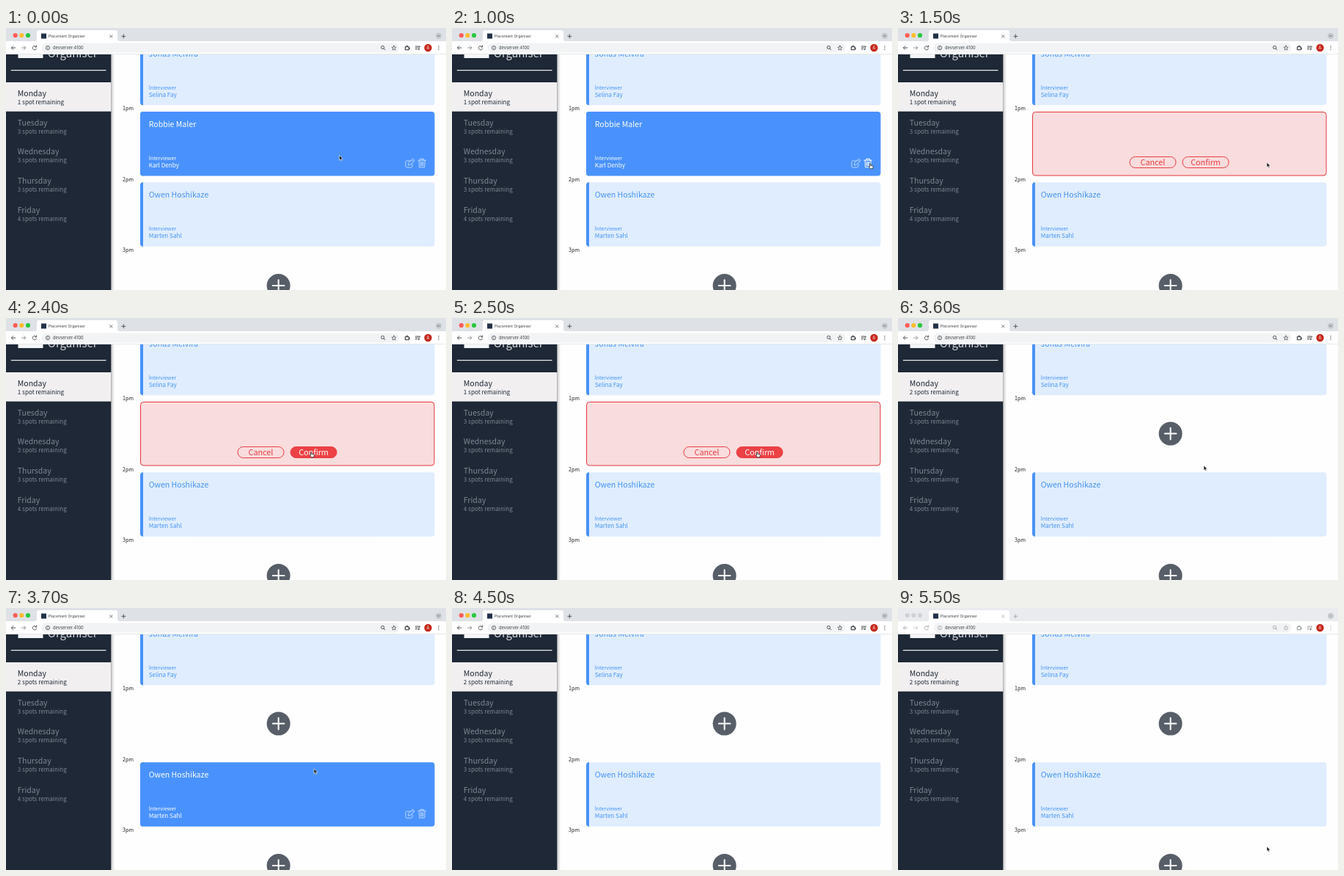
An HTML page that plays this animation: 600x357 px, repeating every 5.6 s.

```html
<!DOCTYPE html>
<html lang="en">
<head>
<meta charset="utf-8">
<title>Placement Organiser</title>
<style>
  html, body { margin: 0; width: 100%; height: 100%; overflow: hidden; background: #fefefe; }
  svg { display: block; width: 100%; height: 100%; }
  text { font-family: "Noto Sans CJK JP", "Noto Sans CJK SC", "Noto Sans CJK", "Noto Sans", sans-serif; }
  .ui { font-family: Inter, Roboto, sans-serif; fill: #3c4043; }
  .line { fill: none; stroke-width: 1; stroke-linecap: round; stroke-linejoin: round; }
  .tool { stroke: #53575b; fill: none; }
  .light { font-weight: 300; }
  .medium { font-weight: 500; }
  .card .bg { fill: #e0edfe; }
  .card .edge { fill: #4a92f7; }
  .card text { fill: #4493f4; }
  .card .icons { display: none; stroke: #fff; }
  .card.hover .bg, .card.hover .edge { fill: #4992fd; }
  .card.hover text { fill: #fff; }
  .card.hover .icons { display: inline; }
  .icons g { opacity: .62; }
  .icons g.active { opacity: 1; }
  .button rect { fill: none; stroke: #e83e43; }
  .button text { fill: #e83e43; font-size: 10.8px; text-anchor: middle; }
  .button.hover rect { fill: #ec4145; }
  .button.hover text { fill: #fff; }
  .blurred .tool { stroke: #a9acaf; }
  .blurred .dot { fill: #cfd1d3; }
  .blurred #strip { fill: #e9ebee; }
</style>
</head>
<body>
<svg id="stage" viewBox="0 0 600 357" xmlns="http://www.w3.org/2000/svg"></svg>
<script>
const LOOP = 5600, STEP = 100;
const CONFIRM_AT = 1200, DELETING_AT = 2600, EMPTY_AT = 3400, BLUR_AT = 4700;

// Pointer tip: [time, x, y]
const pointerPath = [
  [0, 454.5, 173.5], [200, 471, 176], [600, 569.5, 184], [1250, 569.5, 184],
  [1800, 415.5, 182], [3300, 415.5, 182], [3600, 417, 201], [3700, 420, 219],
  [3800, 424, 257], [3900, 430, 327], [4000, 434, 375], [5200, 525, 375],
  [5500, 503, 325], [5600, 503, 325]
];

const text = (x, y, size, str, cls = '', extra = '') =>
  `<text x="${x}" y="${y}" font-size="${size}" class="${cls}" ${extra}>${str}</text>`;

const rect = (x, y, w, h, fill, extra = '') =>
  `<rect x="${x}" y="${y}" width="${w}" height="${h}" fill="${fill}" ${extra}/>`;

const circle = (x, y, r, fill, extra = '') =>
  `<circle cx="${x}" cy="${y}" r="${r}" fill="${fill}" ${extra}/>`;

const path = (d, cls = 'line tool', extra = '') => `<path d="${d}" class="${cls}" ${extra}/>`;

const actionIcons = y => `
  <g class="icons line" transform="translate(0 ${y})">
    <g>${path('M552 67H546.5Q545 67 545 68.5V74.5Q545 76 546.5 76H552.5Q554 76 554 74.5V71', 'line')}
       ${path('M548.5 72.5L549 69.7L554.6 64.2L557.2 66.6L551.4 72.2ZM553.2 65.6L555.7 68', 'line')}</g>
    <g class="trash">${path('M562 66.2H572.4M565 66V64.3H569.4V66M563.2 66.5L563.7 75.8H570.7L571.2 66.5M565.6 68.5V73.7M567.2 68.5V73.7M568.8 68.5V73.7', 'line')}</g>
  </g>`;

const card = (id, y, student, interviewer) => `
  <g id="${id}" class="card">
    ${rect(183, y, 401.5, 87.5, '', 'rx="4" class="bg"')}
    <path class="edge" d="M187 ${y}V${y + 87.5}Q183 ${y + 87.5} 183 ${y + 83.5}V${y + 4}Q183 ${y} 187 ${y}Z"/>
    ${text(194.7, y + 21, 10.55, student)}
    ${text(194.7, y + 65.8, 7, 'Interviewer', 'light')}
    ${text(194.7, y + 75.8, 8.1, interviewer, 'medium')}
    ${actionIcons(y)}
  </g>`;

const addButton = (y, id = '') => `
  <g id="${id}">${circle(371.6, y, 16, '#575e68')}
    ${path(`M363.8 ${y}H379.4M371.6 ${y - 7.8}V${y + 7.8}`, 'line', 'stroke="#fff" style="stroke-width:2"')}
  </g>`;

const button = (id, x, label) => `
  <g id="${id}" class="button">${rect(x, 175.5, 63, 15, '', 'rx="7.5"')}
    ${text(x + 31.5, 187, 10.8, label)}</g>`;

const day = (name, spots, i) => {
  const y = 93 + i * 39.7, first = i === 0;
  const fill = `fill="${first ? '#1f2836' : '#7f8892'}"`;
  return text(15.8, y, 10.5, name, '', fill) +
    text(15.8, y + 11, 8.1, spots, 'light', fill + (first ? ' id="spots"' : ''));
};

const browser = `
  <g id="browser">
    ${rect(0, 0, 600, 18, '#dee1e6', 'id="strip"')}
    <path d="M39 18Q42 18 42 15V6Q42 3 45 3H149Q152 3 152 6V15Q152 18 155 18Z" fill="#fff"/>
    ${rect(0, 18, 600, 18, '#fff')}
    ${rect(0, 35.3, 600, .7, '#dcdee0')}
    ${[['#fc5b57', 12.7], ['#fdbc2e', 21.3], ['#28c840', 30]].map(([c, x]) => circle(x, 10, 3.1, c, 'class="dot"')).join('')}
    ${rect(48, 7.5, 7, 7, '#223248')}
    ${text(57.7, 13.2, 5.1, 'Placement Organiser', 'ui')}
    ${path('M141.6 9.6L145 13M145 9.6L141.6 13', 'line tool', 'style="stroke-width:.8"')}
    ${path('M157.8 11.3H162.8M160.3 8.8V13.8')}
    ${circle(590, 10.7, 4, '#c5c9cd')}
    ${path('M588.4 10L590 11.6L591.6 10', 'line tool', 'style="stroke-width:.8"')}
    ${path('M12.8 27H7.4M9.8 24.6L7.4 27L9.8 29.4')}
    ${path('M21.4 27H26.8M24.4 24.6L26.8 27L24.4 29.4', 'line tool', 'opacity=".6"')}
    ${path('M41.3 25.7A2.7 2.7 0 1 0 41.5 28.2M41.6 24V26H39.6')}
    ${rect(48.5, 20.4, 488, 13, '#f1f3f4', 'rx="6.5"')}
    <circle cx="57" cy="27" r="2.7" class="tool" stroke-width=".8"/>
    ${path('M57 26.8V28.4M57 25.5V25.6', 'line tool', 'style="stroke-width:.8"')}
    ${text(64, 29, 5.7, 'devserver:4100', 'ui')}
    <circle cx="513.6" cy="26.4" r="2.1" class="tool"/>${path('M515.2 28L517 29.8')}
    ${path('M529 24L529.9 26.1L532.1 26.3L530.4 27.8L530.9 30L529 28.8L527.1 30L527.6 27.8L525.9 26.3L528.1 26.1Z', 'line tool', 'style="stroke-width:.8"')}
    ${path('M544.5 25.6H546.3V24.5H547.6V25.6H549.2V27.2H550.2V28.4H549.2V29.6H544.5Z', 'line tool', 'style="stroke-width:1.4"')}
    ${path('M558.4 25H563M558.4 27H561.5M558.4 29H560.3M563.2 29.2V25.2H564.8')}
    ${circle(562.6, 29.2, .9, '#53575b')}
    ${circle(575.5, 27, 5.2, '#c6281c')}
    ${text(575.5, 29, 5.5, 'A', 'ui', 'text-anchor="middle" style="fill:#fff"')}
    ${path('M590 24.7V24.8M590 27V27.1M590 29.3V29.4', 'line tool', 'style="stroke-width:1.3"')}
  </g>`;

const sidebar = `
  ${rect(143, 36, 5, 321, 'url(#shade)')}
  ${rect(0, 36, 143.3, 321, '#1e2836')}
  ${rect(16.5, 7, 34, 34, '#f4f5f6')}
  ${text(56.8, 39.7, 15, 'Organiser', 'light', 'fill="#d5d8dc"')}
  ${rect(6.8, 57, 129.7, 1.2, '#eef0f2')}
  ${rect(0, 74, 143.3, 39.7, '#f1eff0')}
  ${day('Monday', '1 spot remaining', 0)}
  ${['Tuesday', 'Wednesday', 'Thursday', 'Friday'].map((name, i) =>
    day(name, `${i === 3 ? 4 : 3} spots remaining`, i + 1)).join('')}`;

document.getElementById('stage').innerHTML = `
  <defs><linearGradient id="shade">
    <stop stop-color="#000" stop-opacity=".22"/><stop offset="1" stop-color="#000" stop-opacity="0"/>
  </linearGradient></defs>
  ${rect(0, 0, 600, 357, '#fefefe')}
  ${card('upper', 17.7, 'Jonas Melvira', 'Selina Fay')}
  ${card('target', 114, 'Robbie Maler', 'Karl Denby')}
  <g id="confirm">
    ${rect(183.5, 114.5, 400.5, 86.5, '#f9dcdd', 'rx="4" stroke="#e5373d"')}
    ${button('cancelButton', 316, 'Cancel')}
    ${button('confirmButton', 388, 'Confirm')}
  </g>
  <g id="deleting">
    ${rect(183, 114, 401.5, 87.5, '#1e2836', 'rx="4"')}
    ${circle(346.6, 157.5, 11, 'none', 'stroke="#4b535e" stroke-width="2.2"')}
    <path id="spinner" d="M346.6 146.5A11 11 0 0 1 357.6 157.5" fill="none" stroke="#fff" stroke-width="2.2"/>
    ${text(374.6, 163.3, 14, 'Deleting', '', 'fill="#fff" font-weight="700"')}
  </g>
  ${addButton(157.6, 'empty')}
  ${card('lower', 210.2, 'Owen Hoshikaze', 'Marten Sahl')}
  ${addButton(351)}
  ${[1, 2, 3].map((h, i) => text(174, 112.4 + i * 96.3, 7.1, h + 'pm', 'medium', 'fill="#222" text-anchor="end"')).join('')}
  ${sidebar}
  ${browser}
  <g id="pointer" stroke-linejoin="round">
    <path id="arrow" d="M0 0V6.6L1.5 5.2L2.6 7.6L3.7 7.1L2.7 4.8H4.7Z" fill="#111" stroke="#fff" stroke-width=".6"/>
    <path id="hand" d="M.2 1Q.9 .2 1.4 1V3.2L4 3.7Q4.9 4 4.7 5L4.1 7.8H1L-1 5.2Q-.8 4.3 .2 5Z" fill="#fff" stroke="#222" stroke-width=".75"/>
  </g>`;

const el = id => document.getElementById(id);
const show = (id, on) => { el(id).style.display = on ? 'inline' : 'none'; };
const inside = (p, x, y, w, h) => p.x >= x && p.x <= x + w && p.y >= y && p.y <= y + h;

function pointerAt(t) {
  const i = pointerPath.findIndex(k => k[0] > t);
  const [t0, x0, y0] = pointerPath[i - 1], [t1, x1, y1] = pointerPath[i];
  const u = (t - t0) / (t1 - t0);
  const k = t < 3000 ? u * u * (3 - 2 * u) : u;
  return { x: x0 + (x1 - x0) * k, y: y0 + (y1 - y0) * k };
}

function draw(t) {
  const p = pointerAt(t);
  const confirming = t >= CONFIRM_AT && t < DELETING_AT;
  const deleting = t >= DELETING_AT && t < EMPTY_AT;
  const overTrash = t < CONFIRM_AT && inside(p, 560, 176, 14, 16);
  const overConfirm = confirming && inside(p, 388, 175, 63, 16);

  show('target', t < CONFIRM_AT);
  show('confirm', confirming);
  show('deleting', deleting);
  show('empty', t >= EMPTY_AT);
  el('target').classList.toggle('hover', inside(p, 183, 114, 401, 87));
  el('lower').classList.toggle('hover', inside(p, 183, 210, 401, 87));
  el('target').querySelector('.trash').classList.toggle('active', overTrash);
  el('confirmButton').classList.toggle('hover', overConfirm);
  el('spots').textContent = t < EMPTY_AT ? '1 spot remaining' : '2 spots remaining';
  el('spinner').setAttribute('transform', `rotate(${45 + (t - 3100) * .36} 346.6 157.5)`);
  el('browser').classList.toggle('blurred', t >= BLUR_AT);

  el('pointer').setAttribute('transform', `translate(${p.x} ${p.y})`);
  show('hand', overTrash || overConfirm);
  show('arrow', !(overTrash || overConfirm));
}

function tick() {
  const t = performance.now() % LOOP;
  draw(Math.floor(t / STEP) * STEP);
  requestAnimationFrame(tick);
}
tick();
</script>
</body>
</html>
```
